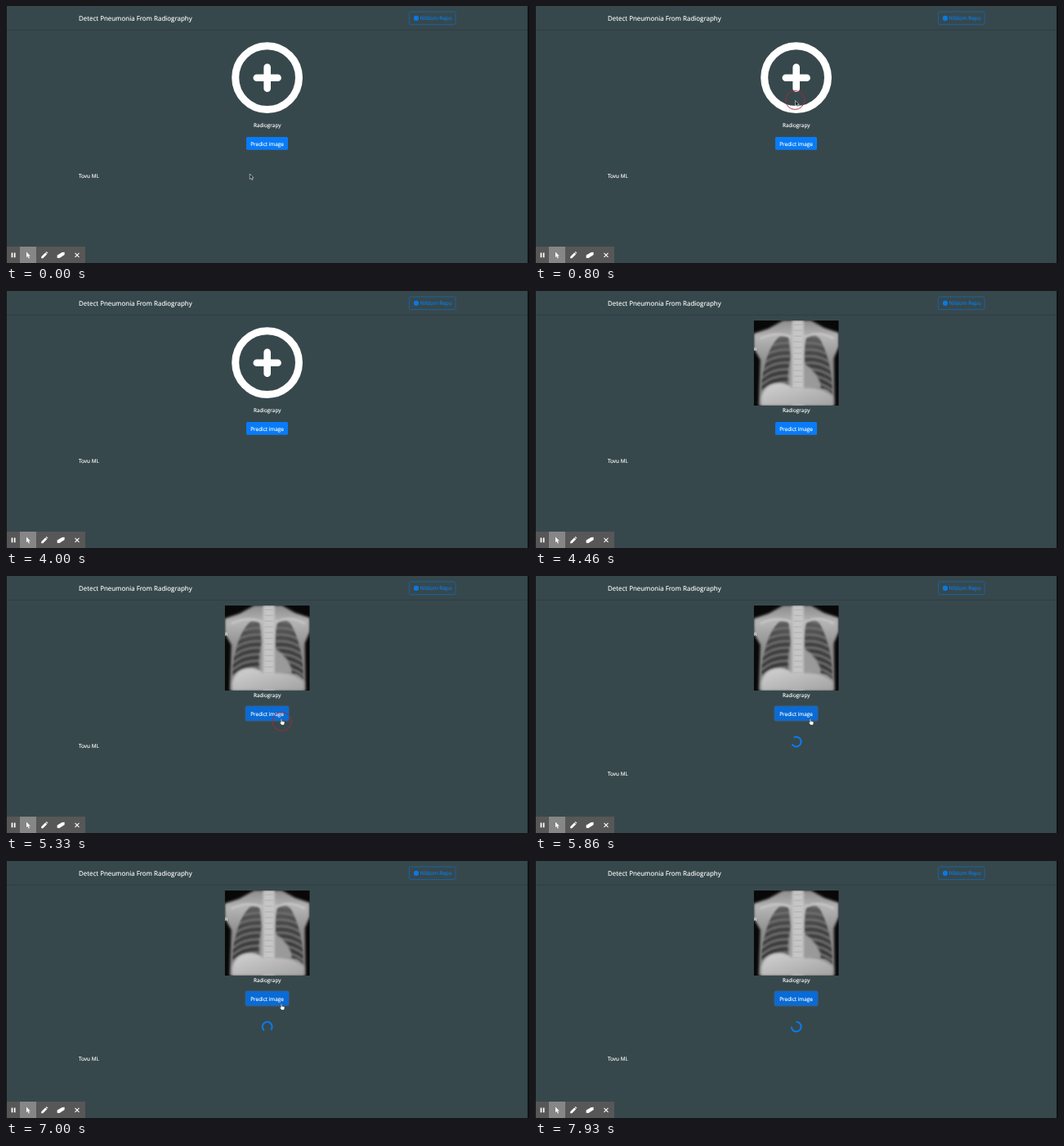
Recreate the animation shown at these times as an HTML page. Size 640 px wide and 314 px high, loop 8 s.

```html
<!DOCTYPE html>
<html lang="en">
<head>
<meta charset="utf-8">
<title>Radiography demo</title>
<style>
  html, body { margin: 0; width: 100%; height: 100%; overflow: hidden; background: #37484c; }
  svg { display: block; width: 100vw; height: 100vh; }
  text {
    font-family: "Open Sans", "Noto Sans", sans-serif; font-size: 6.42px;
    color: #fff; fill: currentColor; stroke: currentColor; stroke-width: .14px;
    text-rendering: geometricPrecision;
  }
  .title { font-size: 7.95px; }
  .link { color: #087cf0; }
  .middle { text-anchor: middle; }
</style>
</head>
<body>
<svg viewBox="0 0 640 314" xmlns="http://www.w3.org/2000/svg">
  <defs>
    <linearGradient id="body" x1="0" y1="0" x2="0" y2="1">
      <stop offset="0" stop-color="#8c8c8c"/>
      <stop offset=".2" stop-color="#b4b4b4"/>
      <stop offset=".5" stop-color="#8c8c8c"/>
      <stop offset="1" stop-color="#868686"/>
    </linearGradient>
    <linearGradient id="lung" x1="0" y1="0" x2="0" y2="1">
      <stop offset="0" stop-color="#626262"/>
      <stop offset=".4" stop-color="#444"/>
      <stop offset="1" stop-color="#363636"/>
    </linearGradient>
    <linearGradient id="belly" x1="0" y1="0" x2="1" y2="1">
      <stop offset="0" stop-color="#d2d2d2"/>
      <stop offset="1" stop-color="#a2a2a2"/>
    </linearGradient>
    <filter id="soft" x="-30%" y="-30%" width="160%" height="160%"><feGaussianBlur stdDeviation="1.6"/></filter>
    <filter id="fine" x="-30%" y="-30%" width="160%" height="160%"><feGaussianBlur stdDeviation=".8"/></filter>
    <clipPath id="plate"><rect width="104" height="104"/></clipPath>
    <clipPath id="lungs"><use href="#lungShape"/></clipPath>
  </defs>

  <rect width="640" height="314" fill="#37484c"/>
  <rect y="28.8" width="640" height=".9" fill="#2f3d42"/>
  <text class="title" x="89" y="18">Detect Pneumonia From Radiography</text>
  <rect x="493.5" y="7" width="56.6" height="15.6" rx="1.8" fill="none" stroke="#1268b8" stroke-width=".8"/>
  <circle cx="502" cy="14.9" r="3.1" fill="#0878e8"/>
  <text class="link" x="506.8" y="17.3">Nildom Repo</text>

  <g id="plus" fill="none" stroke="#fff">
    <circle cx="319.6" cy="87.6" r="38.9" stroke-width="9"/>
    <path d="M306.8 87.8H332.6M319.7 74.8V100.8" stroke-width="8.6" stroke-linecap="round"/>
  </g>

  <g id="xray" transform="translate(267.7 36.1)" clip-path="url(#plate)">
    <rect width="104" height="104" fill="#080808"/>
    <path d="M0 16L18 10 36 0H70L86 9 104 15V32L98 46 99 104H6L8 48 0 34Z" fill="url(#body)" filter="url(#soft)"/>
    <g filter="url(#fine)">
      <path id="lungShape" fill="url(#lung)" d="M37 17C27 20 18 36 14 54 10 67 9 78 10 86 16 76 32 74 44 79 46 62 45 32 42 19ZM66 17C62 26 61 44 63 56 71 62 79 71 82 83 88 82 93 86 96 90 97 66 90 38 81 23 76 17 70 15 66 17Z"/>
      <g id="ribs" clip-path="url(#lungs)" fill="none" stroke="#707070" stroke-width="2.4"></g>
      <path d="M8 22Q28 13 46 20M62 20Q80 12 98 22" fill="none" stroke="#c4c4c4" stroke-width="3"/>
    </g>
    <path d="M46 46C42 56 41 70 43 82H82C82 71 73 60 64 54Z" fill="#9c9c9c" opacity=".9" filter="url(#soft)"/>
    <rect x="47" width="14" height="104" fill="#c6c6c6" filter="url(#soft)"/>
    <path id="spine" fill="none" stroke="#aaa" stroke-width=".8"/>
    <path d="M9 94C14 73 38 73 48 83 62 82 82 79 97 93V104H9Z" fill="url(#belly)" filter="url(#soft)"/>
    <text x=".2" y="37" style="font-size:5px">R</text>
  </g>

  <text class="middle" x="319.7" y="147.5">Radiograpy</text>
  <rect id="ring" x="292.6" y="158.6" width="54" height="18.8" rx="2.6" fill="#2664a6"/>
  <rect id="button" x="294" y="160" width="51" height="15.8" rx="1.6"/>
  <text class="middle" x="319.6" y="170.5">Predict image</text>
  <path id="spinner" d="M4.17 4.17A5.9 5.9 0 1 1 4.17 -4.17" fill="none" stroke="#087cf4" stroke-width="2"/>
  <text id="footer" x="89" y="210.3">Tovu ML</text>

  <rect y="294" width="97" height="20" fill="#575757"/>
  <rect x="17" y="294" width="20" height="20" fill="#868686"/>
  <g fill="#fff">
    <path d="M6.6 301.4H8.3V307.2H6.6ZM9.8 301.4H11.5V307.2H9.8Z"/>
    <path d="M25 300.5V307.1L26.5 305.8 27.8 308.5 28.9 308 27.6 305.4H29.8Z"/>
    <path d="M43.2 308.2V306.2L48.2 301.2 50.2 303.2 45.2 308.2ZM48.7 300.7L49.6 299.9 51.4 301.7 50.6 302.6Z"/>
    <path d="M62.6 304.5L68.6 300.9 71.6 300.7V303.9L65.4 308 62.6 307.8Z"/>
    <path d="M84.5 301.8L89.5 306.8M89.5 301.8L84.5 306.8" stroke="#fff" stroke-width="1.1"/>
  </g>
  <rect width=".9" height="314" fill="#111"/>
  <rect x="638.4" width="1.6" height="314" fill="#080c0d"/>

  <circle id="ripple" r="11.5" fill="none" stroke="#a8283c" stroke-width=".9"/>
  <path id="arrow" d="M0 0V6.6L1.5 5.3 2.6 7.6 3.7 7.1 2.7 4.9H4.7Z" fill="#1c2224" stroke="#eee" stroke-width=".6"/>
  <path id="hand" d="M-1.5 -3.6Q-.8 -4.4 -.2 -3.6V-1L2.6 -.4Q3.4 0 3.2 1L2.5 3.8H-.7L-2.9 .8Q-2.6 -.1 -1.5 .7Z" fill="#fff" stroke="#222" stroke-width=".45"/>
</svg>
<script>
  const LOOP = 8000, STEP = 200 / 3;
  const HIDE_FIRST = 860, IMAGE_IN = 4460, ENTER = 4860, CLICK = 5260, SUBMIT = 5393, LEAVE = 7930;
  const LATE_STEPS = [6660, 6800, 7000, 7200, 7330, 7400, 7530, 7730, 7930];
  const el = id => document.getElementById(id);
  const show = (id, on) => el(id).style.display = on ? "" : "none";
  const place = (id, x, y) => el(id).setAttribute("transform", `translate(${x} ${y})`);
  const ease = p => { p = Math.min(1, Math.max(0, p)); return p * p * (3 - 2 * p); };
  const mix = (a, b, p) => a + (b - a) * p;

  let ribs = "";
  for (let i = 0; i < 8; i++) {
    const y = 23 + i * 8;
    ribs += `<path d="M47 ${y - 3}Q25 ${y - 6} 9 ${y + 8}M61 ${y - 3}Q82 ${y - 6} 98 ${y + 8}"/>`;
  }
  el("ribs").innerHTML = ribs;
  el("spine").setAttribute("d", Array.from({ length: 12 }, (_, i) => `M49 ${5 + i * 7}h10`).join(""));

  function recorded(t) {
    if (t >= LATE_STEPS[0]) return LATE_STEPS.filter(s => s <= t).pop();
    const start = t < ENTER ? 60 : ENTER;
    return t < start ? 0 : start + Math.floor((t - start) / STEP + 0.01) * STEP;
  }

  function pointer(t) {
    if (t < HIDE_FIRST) {
      const p = ease((t - 60) / 600);
      return [mix(298.3, 318.5, p), mix(205, 115.5, p)];
    }
    const p = ease((t - ENTER + STEP) / 400);
    return [mix(392, 337.8, p), mix(222, 178.3, p)];
  }

  function draw(t) {
    const s = recorded(t);
    const first = t < HIDE_FIRST, second = t >= ENTER && t < LEAVE;
    const [x, y] = pointer(s);
    const over = (first || second) && x > 294 && x < 346 && y > 160 && y < 179;
    const submitted = t >= SUBMIT;

    show("plus", t < IMAGE_IN);
    show("xray", t >= IMAGE_IN);
    show("ring", t >= CLICK);
    show("spinner", submitted);
    el("button").setAttribute("fill", over || submitted ? "#086bd7" : "#087cf8");
    el("footer").setAttribute("y", submitted ? 244.3 : 210.3);
    el("spinner").setAttribute("transform", `translate(319.7 202.5) rotate(${195 + (s - 5860) * 0.536})`);

    show("arrow", (first || second) && !over);
    show("hand", over);
    place("arrow", x, y);
    place("hand", x, y);
    show("ripple", (t >= 727 && first) || (t >= CLICK && t < SUBMIT));
    place("ripple", x - 0.3, y - 0.5);
  }

  const begin = performance.now();
  function tick(now) {
    draw(Math.max(0, now - begin) % LOOP);
    requestAnimationFrame(tick);
  }
  draw(0);
  requestAnimationFrame(tick);
</script>
</body>
</html>
```
